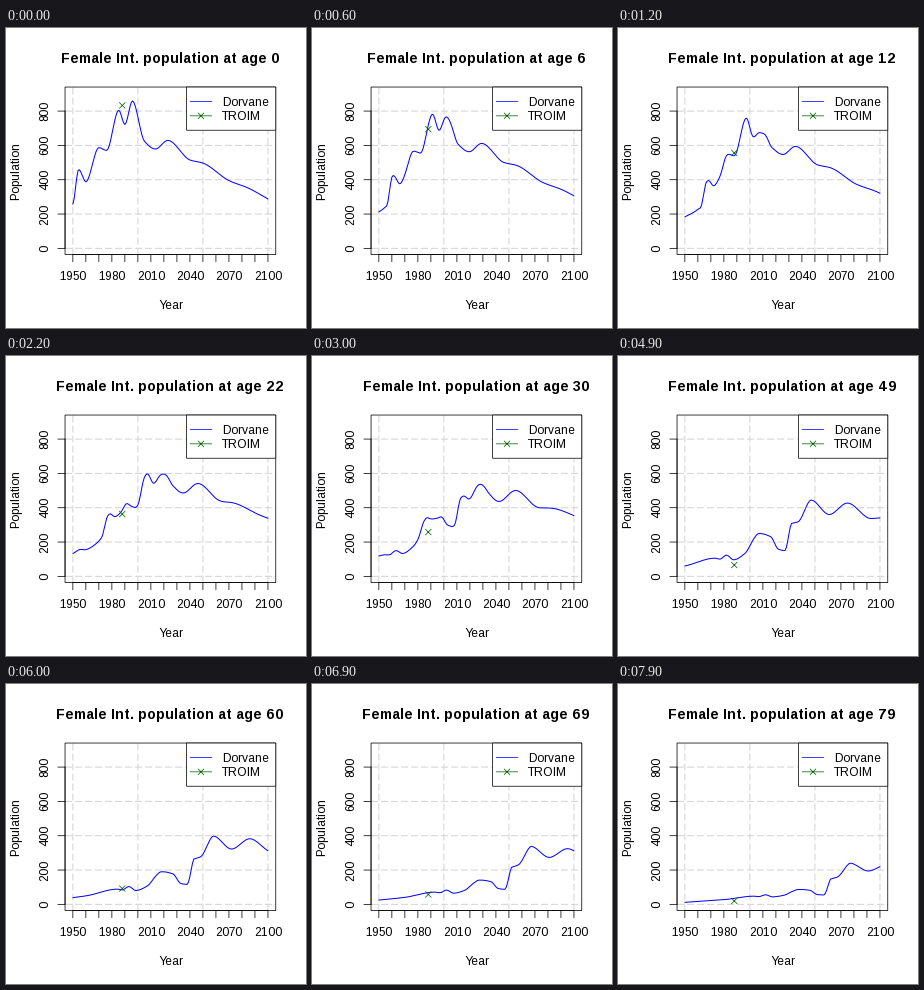
Animation of 300x300 px, one loop 8000 ms. Source, as a matplotlib script:

```python
import numpy as np
import matplotlib.pyplot as plt
from matplotlib.animation import FuncAnimation
from matplotlib.patches import Rectangle

plt.rcParams.update({"font.family": "Liberation Sans", "text.hinting_factor": 1,
                     "path.snap": False})

SIZE, DPI = 300, 72
LEFT, RIGHT, TOP, BOTTOM = 59.04, 269.76, 59.04, 226.56
LINE = 14.4  # height of one margin line
FIRST, LAST, AGES = 1950, 2100, 80
YEARS = np.arange(FIRST, LAST + 1)
BLUE, GREEN, GRID = "#0000ff", "#006400", "#d3d3d3"
GROWN, ADULT = 12, 37

# cohort size by birth year: as newborns, and at the start of adulthood
NEWBORNS = [(1913, 95), (1938, 194), (1950, 258), (1954.5, 460), (1960, 388),
            (1970, 587), (1976, 571), (1985.3, 805), (1990, 722), (1995.8, 859),
            (2005, 625), (2013.5, 579), (2023, 629), (2040, 515), (2050, 497),
            (2070, 395), (2085, 351), (2100, 288)]
ADULTS = [(1871, 31), (1901, 71), (1924, 124), (1928, 118), (1933, 145),
          (1938.5, 113), (1947, 163), (1958, 325), (1967, 298), (1973, 202),
          (1978, 192), (1983, 352), (1988, 358), (1998, 485), (2012, 393),
          (2026, 466), (2044, 368), (2055, 373), (2088, 290)]


def smooth(points):
    """Shape-preserving cubic curve through the points."""
    x, y = np.array(points, float).T
    h = np.diff(x)
    d = np.diff(y) / h
    m = np.r_[d[0], np.zeros(len(x) - 2), d[-1]]
    a, b = d[:-1], d[1:]
    same = a * b > 0
    m[1:-1][same] = 2 * a[same] * b[same] / (a + b)[same]

    def curve(t):
        t = np.clip(t, x[0], x[-1])
        i = np.clip(np.searchsorted(x, t, side="right") - 1, 0, len(h) - 1)
        u = (t - x[i]) / h[i]
        return ((1 + 2 * u) * (1 - u) ** 2 * y[i] + u * (1 - u) ** 2 * h[i] * m[i]
                + u * u * (3 - 2 * u) * y[i + 1] + u * u * (u - 1) * h[i] * m[i + 1])

    return curve


newborns, adults = smooth(NEWBORNS), smooth(ADULTS)


def bump(born, centre, width):
    return np.exp(-((born - centre) / width) ** 2)


def population(age):
    """Each birth cohort thins out in childhood, migrates, then dies off."""
    born = YEARS - age
    loss = (0.055 + 0.12 * bump(born, 1953.5, 3) + 0.09 * bump(born, 1966, 3.5)
            + 0.16 * bump(born, 1996, 5))
    young = newborns(born) * (1 - loss * min(age / GROWN, 1))
    w = np.clip((age - GROWN) / (ADULT - GROWN), 0, 1)

    past = max(age - ADULT, 0)
    rate = np.interp(born, [1940, 1955, 1978, 1983, 1998], [13, 22, 20, 11, 7]) / 1000
    alive = np.exp(-rate * past - 0.41 * (past / 42) ** 4)
    return (1 - w) * young + w * adults(born) * alive


def survey(age):
    return np.interp(age, [0, 12, 22, 37, 49, 60, 79],
                     [833, 556, 363, 166, 66, 92, 20])


def px(year):
    return 66.84 + (year - FIRST) * 195.11 / (LAST - FIRST)


def py(value):
    return 220.36 - value * 0.1716


fig = plt.figure(figsize=(SIZE / DPI, SIZE / DPI), dpi=DPI, facecolor="white")
ax = fig.add_axes([0, 0, 1, 1])
ax.set(xlim=(0, SIZE), ylim=(SIZE, 0))
ax.axis("off")


def line(x, y, color="black", lw=0.75, **kw):
    return ax.plot(x, y, color=color, lw=lw, solid_capstyle="round", **kw)[0]


def label(x, y, text, size=12, ha="center", **kw):
    return ax.text(x, y, text, fontsize=size, ha=ha, va="baseline",
                   rotation_mode="anchor", **kw)


def cross_y(y, r=2.86):
    return [y - r, y + r, np.nan, y + r, y - r]


def cross(x, y, z, r=2.86):
    return line([x - r, x + r, np.nan, x - r, x + r], cross_y(y), GREEN, zorder=z)


# grid
dash = dict(color=GRID, lw=1, dashes=(7, 3), dash_capstyle="butt", zorder=1)
for year in range(FIRST, LAST + 1, 50):
    line([px(year)] * 2, [BOTTOM, TOP], **dash)
for value in range(0, 801, 200):
    line([LEFT, RIGHT], [py(value)] * 2, **dash)

# frame and axes
ax.add_patch(Rectangle((LEFT, TOP), RIGHT - LEFT, BOTTOM - TOP,
                       fill=False, lw=0.75, zorder=3))
line([px(FIRST), px(LAST)], [BOTTOM] * 2, zorder=3)
line([LEFT] * 2, [py(0), py(800)], zorder=3)
for year in range(FIRST, LAST + 1, 10):
    line([px(year)] * 2, [BOTTOM, BOTTOM + LINE / 2], zorder=3)
    if (year - FIRST) % 30 == 0:
        label(px(year), BOTTOM + 1.8 * LINE, str(year))
for value in range(0, 801, 200):
    line([LEFT - LINE / 2, LEFT], [py(value)] * 2, zorder=3)
    label(LEFT - 1.2 * LINE, py(value), str(value), rotation=90)

mid_x, mid_y = (LEFT + RIGHT) / 2, (TOP + BOTTOM) / 2
label(mid_x, BOTTOM + 3.8 * LINE, "Year")
label(LEFT - 3.2 * LINE, mid_y, "Population", rotation=90)
title = label(mid_x, 34.8, "", size=14.4, weight="bold")

# legend
ax.add_patch(Rectangle((180.6, TOP), RIGHT - 180.6, 3 * LINE,
                       fc="white", ec="black", lw=0.75, zorder=5))
for row, (name, color) in enumerate([("Dorvane", BLUE), ("TROIM", GREEN)], 1):
    y = TOP + row * LINE
    line([184.2, 205.8], [y, y], color, zorder=6)
    label(216.2, y + 4.4, name, ha="left", zorder=6)
cross(195, TOP + 2 * LINE, 7)

curve = line(px(YEARS), py(0 * YEARS), BLUE, lw=1, zorder=2)
mark = cross(px(1988), py(0), 4)


def draw(age):
    title.set_text(f"Female Int. population at age {age}")
    curve.set_ydata(py(population(age)))
    mark.set_ydata(cross_y(py(survey(age))))
    return title, curve, mark


anim = FuncAnimation(fig, draw, frames=AGES, interval=100, repeat=True,
                     repeat_delay=0, blit=False)
plt.show()
```
